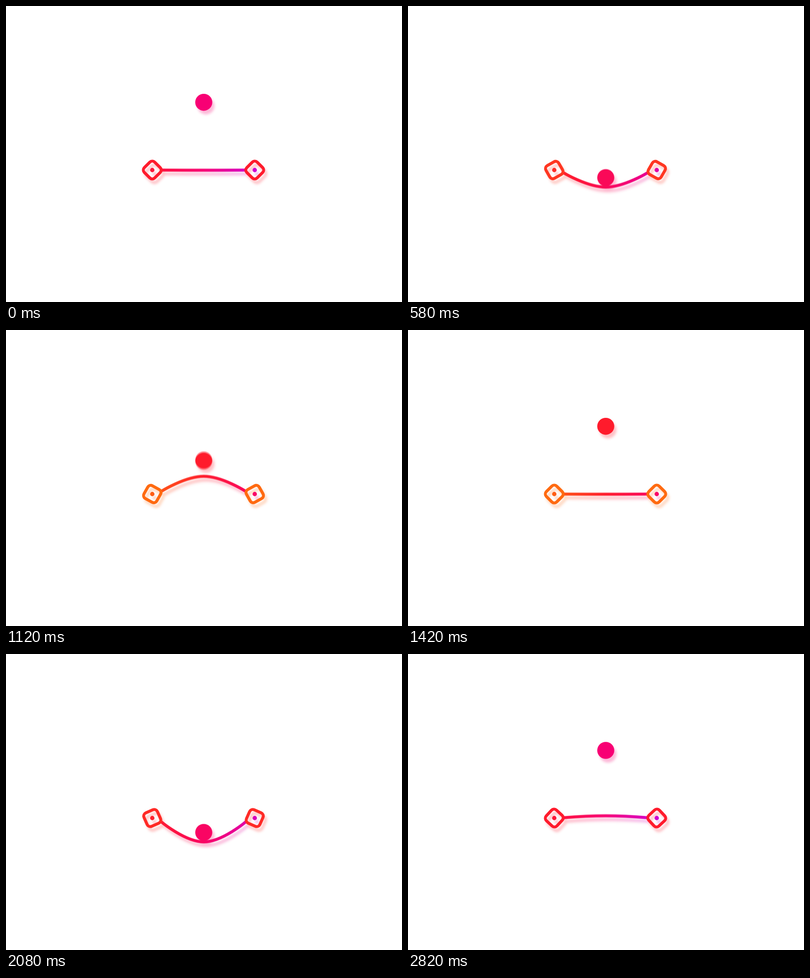
Recreate the animation shown at these times as an HTML page with a canvas. Size 800 by 600 pixels, loop 2.84 s.

```html
<!DOCTYPE html>
<html lang="en">
<head>
<meta charset="utf-8">
<title>Bouncing ball</title>
<style>
html, body { margin: 0; width: 100%; height: 100%; overflow: hidden; background: #fff; }
canvas { display: block; width: 100vw; height: 100vh; }
</style>
</head>
<body>
<canvas id="stage" width="800" height="600"></canvas>
<script>
const W = 800, H = 600;
const BOUNCE = 1420, STEP = 20;
const SHUTTER = 10, SAMPLES = 6;
const LEFT = 295.5, RIGHT = 502.5, MID = 399.5, REST = 332.5;
const TOP = 195.2, DROP = 173.3, LOW = 840, RELEASE = 1050;
const RADIUS = 17.2, TOUCH = 19.2, LINE = 6;
const COLORS = [[255, 106, 16], [255, 27, 44], [248, 0, 116], [198, 0, 232]];

function makeLayer() {
  const c = document.createElement('canvas');
  c.width = W;
  c.height = H;
  return c.getContext('2d');
}

const view = document.getElementById('stage').getContext('2d');
const shapes = makeLayer();
const scene = makeLayer();

const lerp = (a, b, u) => a + (b - a) * u;
const clamp = u => Math.min(1, Math.max(0, u));
const smooth = u => u * u * (3 - 2 * u);
const inOutCubic = u => u < 0.5 ? 4 * u ** 3 : 1 - 4 * (1 - u) ** 3;

// Cubic-bezier easing with flat ends and handles at x1 and x2.
function ease(x, x1, x2) {
  let lo = 0, hi = 1;
  for (let i = 0; i < 24; i++) {
    const s = (lo + hi) / 2, r = 1 - s;
    if (3 * r * r * s * x1 + 3 * r * s * s * x2 + s ** 3 < x) lo = s;
    else hi = s;
  }
  return smooth(lo);
}

function ballY(p) {
  const k = p < LOW
    ? inOutCubic(p / LOW)
    : 1 - ease((p - LOW) / (BOUNCE - LOW), 0.42, 0.4);
  return TOP + DROP * k;
}

const pressed = p => ballY(p) + TOUCH - REST;

// The string's swing: time and depth at each turning point.
const SWING = [[1180 - BOUNCE, -44], [149, 22], [380, -12], [600, 10]];

function freeSag(p) {
  for (let i = 1; i < SWING.length; i++) {
    const [t0, d0] = SWING[i - 1], [t1, d1] = SWING[i];
    if (p < t1) return lerp(d0, d1, smooth(clamp((p - t0) / (t1 - t0))));
  }
  return -100;
}

function sag(p) {
  if (p < RELEASE) return Math.max(freeSag(p), pressed(p));
  if (p < 1180) {
    const u = (p - RELEASE) / (1180 - RELEASE);
    return lerp(pressed(RELEASE), -44, 1 - (1 - u) ** 2);
  }
  return freeSag(p - BOUNCE);
}

function colorAt(pos) {
  const i = Math.min(COLORS.length - 2, Math.floor(pos));
  const rgb = COLORS[i].map((v, n) => Math.round(lerp(v, COLORS[i + 1][n], pos - i)));
  return `rgb(${rgb})`;
}

function dot(g, x, y, r) {
  g.beginPath();
  g.arc(x, y, r, 0, Math.PI * 2);
  g.fill();
}

function diamond(g, x, angle) {
  const side = 29.6;
  g.save();
  g.translate(x, REST);
  g.rotate(Math.PI / 4 + angle);
  g.beginPath();
  g.roundRect(-side / 2, -side / 2, side, side, 7);
  g.stroke();
  g.restore();
  dot(g, x, REST, 4.4);
}

function string(g, depth, angle) {
  const dx = 18 * Math.cos(angle), y = REST + 18 * Math.sin(angle);
  const x0 = LEFT + dx, x1 = RIGHT - dx, low = REST + depth, handle = 38;
  g.beginPath();
  g.moveTo(x0, y);
  g.bezierCurveTo(x0, y, MID - handle, low, MID, low);
  g.bezierCurveTo(MID + handle, low, x1, y, x1, y);
  g.stroke();
}

function drawShapes(g, time) {
  const t = (time + 2 * BOUNCE) % (2 * BOUNCE);
  const p = t % BOUNCE;
  const change = smooth(clamp((p - 470) / 270));
  const first = t < BOUNCE ? 1 - change : change;
  const depth = sag(p);
  const angle = depth * 0.44 * Math.PI / 180;

  const paint = g.createLinearGradient(275, 0, 524, 0);
  for (let i = 0; i <= 4; i++) paint.addColorStop(i / 4, colorAt(first + i / 2));

  g.clearRect(0, 0, W, H);
  g.lineWidth = LINE;
  g.strokeStyle = g.fillStyle = paint;
  string(g, depth, angle);
  diamond(g, LEFT, angle);
  diamond(g, RIGHT, -angle);
  g.fillStyle = colorAt(first + 1);
  dot(g, MID, ballY(p), RADIUS);
}

function drawScene(time) {
  drawShapes(shapes, time);
  scene.fillStyle = '#fff';
  scene.fillRect(0, 0, W, H);
  scene.save();
  scene.globalAlpha = 0.27;
  scene.filter = 'blur(2.5px)';
  scene.drawImage(shapes.canvas, 4.5, 7.5);
  scene.restore();
  scene.drawImage(shapes.canvas, 0, 0);
}

let shown = -1;

function frame(now) {
  const time = Math.floor(now / STEP) * STEP % (2 * BOUNCE);
  if (time !== shown) {
    shown = time;
    // Average several moments for motion blur.
    for (let i = 0; i < SAMPLES; i++) {
      drawScene(time + SHUTTER * ((i + 0.5) / SAMPLES - 0.5));
      view.globalAlpha = 1 / (i + 1);
      view.drawImage(scene.canvas, 0, 0);
    }
  }
  requestAnimationFrame(frame);
}

frame(0);
</script>
</body>
</html>
```
